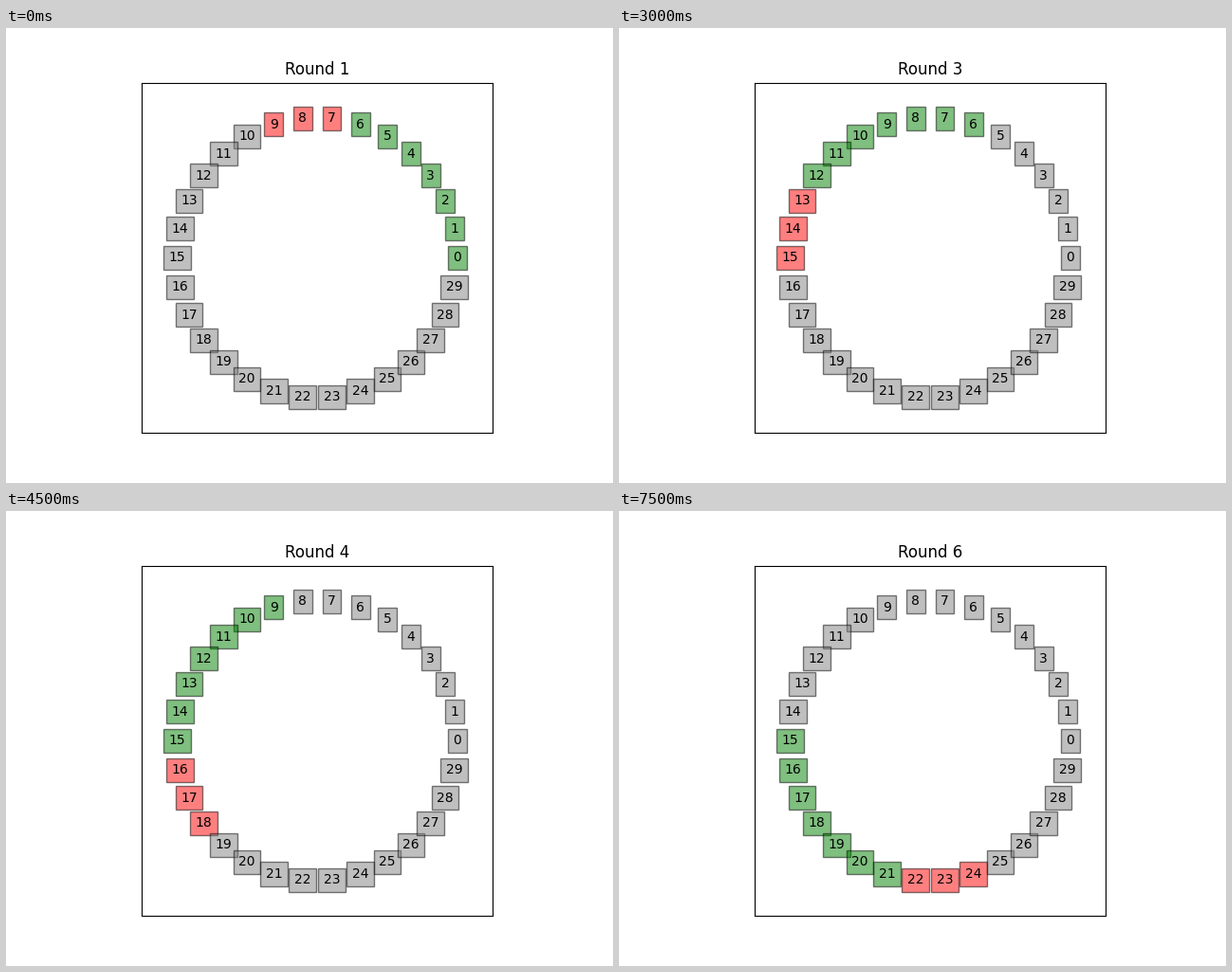
A matplotlib script that plays this animation: 640x480 px, repeating every 8000 ms.

```python
import math

import matplotlib.pyplot as plt
from matplotlib.animation import FuncAnimation

COUNT = 30          # labels around the ring
STEP = 3            # labels advanced per round
GREENS, REDS = 7, 3
TICK_MS = 500
TICKS_PER_ROUND = 3
TICKS = 16

fig, ax = plt.subplots(figsize=(6.4, 4.8), dpi=100)
ax.set_aspect("equal")
ax.set(xlim=(-1.25, 1.25), ylim=(-1.25, 1.25), xticks=[], yticks=[])
title = ax.set_title("Round 1")


def make_label(i):
    angle = 2 * math.pi * i / COUNT
    return ax.text(math.cos(angle), math.sin(angle), str(i),
                   ha="center", va="center", fontsize=10,
                   bbox=dict(facecolor="gray", alpha=0.5))


labels = [make_label(i) for i in range(COUNT)]


def color_of(i, turn):
    offset = (i - STEP * turn) % COUNT
    if offset < GREENS:
        return "green"
    if offset < GREENS + REDS:
        return "red"
    return "gray"


def update(tick):
    turn = tick // TICKS_PER_ROUND
    title.set_text(f"Round {turn + 1}")
    for i, label in enumerate(labels):
        label.get_bbox_patch().set_facecolor(color_of(i, turn))
    return [title, *labels]


anim = FuncAnimation(fig, update, frames=TICKS, interval=TICK_MS,
                     init_func=lambda: update(0), repeat=True,
                     repeat_delay=0, blit=False)
plt.show()
```
